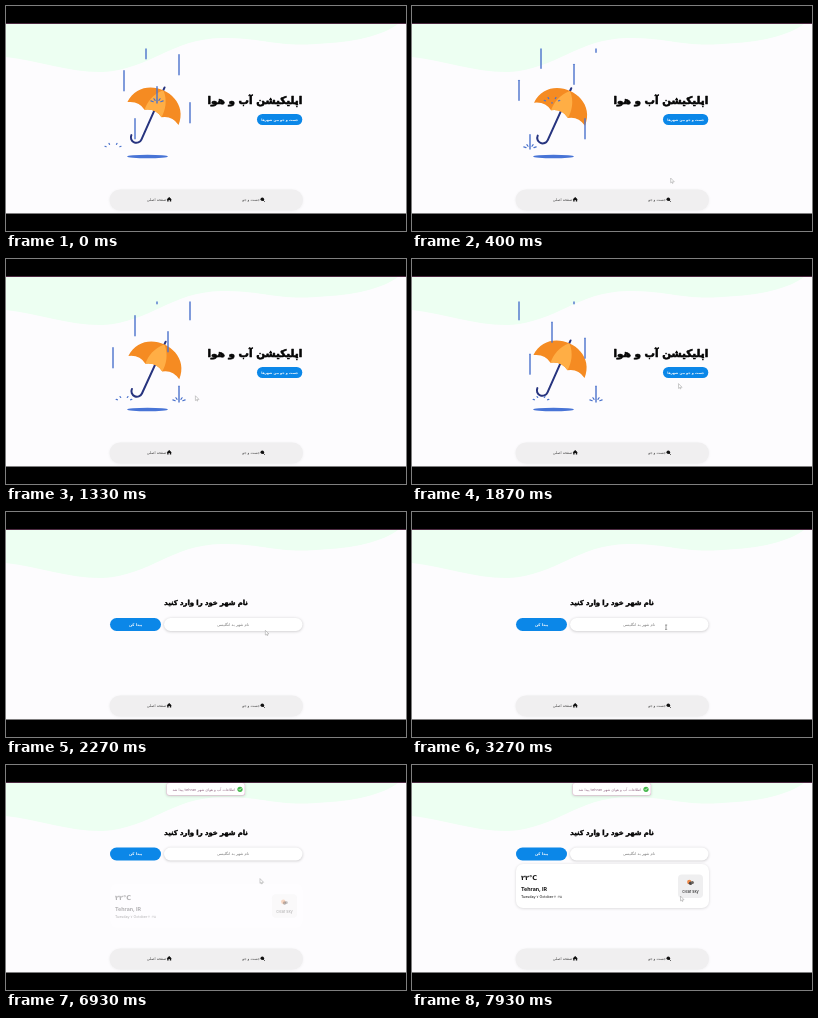
These frames come from a looping animation (400 by 225 pixels, 8 s). An HTML page with a canvas:

```html
<!DOCTYPE html>
<html lang="fa">
<head>
<meta charset="utf-8">
<title>Weather app</title>
<style>
  html, body { margin: 0; width: 100%; height: 100%; overflow: hidden; background: #000; }
  canvas { display: block; width: 400px; height: 225px; }
</style>
</head>
<body>
<canvas id="stage"></canvas>
<script>
const LOOP = 8000, HOME_END = 2270, FOCUS = 2730, FOUND = 6270;
const canvas = document.getElementById('stage');
const ctx = canvas.getContext('2d');
const ratio = window.devicePixelRatio || 1;
canvas.width = 400 * ratio;
canvas.height = 225 * ratio;

const BLUE = '#0b87e8', RAIN = '#4a72cc', NAVY = '#27347f';
const clamp = v => Math.max(0, Math.min(1, v));
const smooth = v => v * v * (3 - 2 * v);
const progress = (t, from, to) => clamp((t - from) / (to - from));

function text(str, x, y, size, color, { weight = 400, align = 'center', dir = 'rtl', family = 'DejaVu Sans', heavy = 0 } = {}) {
  ctx.font = `${weight} ${size}px "${family}", "DejaVu Sans", sans-serif`;
  ctx.direction = dir;
  ctx.textAlign = align;
  ctx.fillStyle = ctx.strokeStyle = color;
  ctx.fillText(str, x, y);
  if (heavy) {
    ctx.lineWidth = heavy;
    ctx.lineJoin = 'round';
    ctx.strokeText(str, x, y);
  }
}

function box(x, y, w, h, r, color, shadow) {
  ctx.save();
  if (shadow) {
    ctx.shadowColor = shadow;
    ctx.shadowBlur = 3 * ratio;
    ctx.shadowOffsetY = 0.6 * ratio;
  }
  ctx.fillStyle = color;
  ctx.beginPath();
  ctx.roundRect(x, y, w, h, r);
  ctx.fill();
  ctx.restore();
}

function ellipse(x, y, rx, ry, color) {
  ctx.fillStyle = color;
  ctx.beginPath();
  ctx.ellipse(x, y, rx, ry, 0, 0, 7);
  ctx.fill();
}

const circle = (x, y, r, color) => ellipse(x, y, r, r, color);

function line(color, width, ...points) {
  ctx.strokeStyle = color;
  ctx.lineWidth = width;
  ctx.lineCap = 'round';
  ctx.lineJoin = 'round';
  ctx.beginPath();
  points.forEach(([x, y]) => ctx.lineTo(x, y));
  ctx.stroke();
}

function shape(path, color) {
  ctx.fillStyle = color;
  ctx.fill(new Path2D(path));
}

function background() {
  ctx.fillStyle = '#fdfcfe';
  ctx.fillRect(0, 17, 400, 191);
  shape('M0 18V51C35 55 65 67 97 66C145 63 165 33 215 32C260 32 270 41 310 38C350 36 375 30 392 18Z', '#edfff2');
  ctx.fillStyle = '#4d2a42';
  ctx.fillRect(0, 17, 400, 1);
}

function navigation() {
  box(103.5, 183.5, 193.5, 21, 10.5, '#f0eff0', 'rgba(0,0,0,.06)');
  text('جست و جو', 245, 194.8, 3.7, '#444');
  text('صفحه اصلی', 150.5, 194.8, 3.8, '#444');
  circle(256.3, 193.2, 1.8, '#111');
  line('#111', 0.9, [257.2, 194.2], [258.4, 195.4]);
  shape('M160.6 193.4L163.2 191L165.8 193.4H165.2V195.6H163.8V194H162.6V195.6H161.2V193.4Z', '#111');
}

function splash(x, y, k) {
  const near = 4 + 5 * smooth(k), far = near + 2.4 * (1 - k) + 0.5;
  for (const angle of [0.45, 1.1]) {
    for (const side of [-1, 1]) {
      const dx = side * Math.cos(angle), dy = -0.7 * Math.sin(angle);
      line(RAIN, 1.2, [x + dx * near, y + dy * near], [x + dx * far, y + dy * far]);
    }
  }
}

// Eight columns of rain; the ones above the canopy stop there.
function rain(t) {
  const top = 43, speed = 0.16, period = 840;
  for (let i = 0; i < 8; i++) {
    const x = 107 + 11 * i;
    const land = i > 2 && i < 6 ? 97 : 143;
    const age = (t + 760 - 100 * (5 * i % 8)) % period;
    const head = top + age * speed;
    const from = Math.max(top, head - 20), to = Math.min(head, land);
    if (from < to) line(RAIN, 1.4, [x, from], [x, to]);
    const k = (head - land) / speed / 210;
    if (k > 0 && k < 1) splash(x, land, k);
  }
}

function umbrella(t) {
  const sway = (1 - Math.cos(t / 1870 * 2 * Math.PI)) / 2;
  ctx.save();
  ctx.translate(147 + 1.3 * sway, 107.5 + 1.8 * sway);
  ctx.rotate((24 + sway) * Math.PI / 180);
  ctx.strokeStyle = NAVY;
  ctx.lineWidth = 2;
  ctx.lineCap = 'round';
  ctx.stroke(new Path2D('M0 -28.5V28.5A5.5 5.5 0 0 1 -11 28.5'));
  shape('M-28 0C-27 -34 27 -34 28 0Q18 -6 9.3 0Q0 -6 -9.3 0Q-18 -6 -28 0Z', '#f58b22');
  shape('M0 -25.5C-8 -18 -10 -8 -9.3 0Q0 -6 9.3 0C10 -8 8 -18 0 -25.5Z', '#ffae45');
  ctx.restore();
}

function home(t) {
  ellipse(141.5, 150.5, 20.5, 1.8, '#4874d6');
  umbrella(t);
  rain(t);
  text('اپلیکیشن آب و هوا', 296.3, 97.8, 10.4, '#060606', { weight: 700, align: 'right', heavy: 0.6 });
  box(251, 108, 45.3, 11, 5.5, BLUE);
  text('جست و جو بین شهرها', 273.7, 114.8, 3.3, '#fff', { weight: 700 });
}

function searchForm(t) {
  const firstKey = 4130, keyGap = 180, blink = 500;
  const keys = Math.max(0, Math.min(6, Math.floor((t - firstKey) / keyGap) + 1));
  const typed = t < FOUND ? 'tehran'.slice(0, keys) : '';
  ctx.save();
  if (t >= FOUND) ctx.translate(0, -23.5);
  text('نام شهر خود را وارد کنید', 200, 93.2, 6.8, '#060606', { weight: 700, heavy: 0.45 });
  box(104, 106, 51, 13, 6.5, BLUE);
  text('پیدا کن', 129.5, 113.8, 3.7, '#fff', { weight: 700 });
  box(158, 106, 138.5, 13, 6.5, '#fff', 'rgba(0,0,0,.22)');
  if (typed) text(typed, 227, 113.6, 3.5, '#444', { dir: 'ltr', family: 'Inter' });
  else text('نام شهر به انگلیسی', 227, 113.8, 3.9, '#777');
  const lastInput = keys ? firstKey + (keys - 1) * keyGap : FOCUS;
  if (t >= FOCUS && t < FOUND && Math.floor((t - lastInput) / blink) % 2 === 0) {
    const x = 227 - (typed ? ctx.measureText(typed).width / 2 + 0.5 : 0);
    line('#333', 0.6, [x, 110.3], [x, 114.7]);
  }
  ctx.restore();
}

function weatherCard(t) {
  const k = smooth(progress(t, 6570, 7530));
  if (!k) return;
  const latin = { weight: 700, align: 'left', dir: 'ltr', family: 'Inter' };
  ctx.save();
  ctx.globalAlpha = k;
  ctx.translate(0, 29 * (1 - k));
  box(104, 99, 193, 44, 7, '#fff', `rgba(0,0,0,${0.16 * k ** 3})`);
  text('۲۲°C', 109, 115, 6.6, '#111', { ...latin, family: 'DejaVu Sans' });
  text('Tehran, IR', 109, 125.8, 5.3, '#111', latin);
  text('Tuesday ۷ October ۲۰۲۵', 109, 132.8, 3.6, '#333', { ...latin, weight: 500 });
  box(266, 109.5, 25, 23.5, 4, '#efeff0');
  circle(277.3, 117, 2.2, '#ef8a4a');
  circle(278.6, 118.3, 1.8, '#4a4745');
  circle(280.4, 117.6, 1.5, '#6b6661');
  text('clear sky', 278.5, 128.2, 3.8, '#333', { ...latin, weight: 500, align: 'center' });
  ctx.restore();
}

function toast(t) {
  const k = progress(t, FOUND, FOUND + 350);
  if (!k) return;
  ctx.save();
  ctx.globalAlpha = k;
  ctx.translate(0, -18 * (1 - k) ** 3);
  box(160.5, 18, 78.5, 12.5, 2.5, '#e9b9d8', 'rgba(0,0,0,.2)');
  box(160.9, 18, 77.7, 12, 2.3, '#fff');
  text('اطلاعات آب و هوای شهر tehran پیدا شد', 229, 25.8, 3.6, '#8f6480', { align: 'right' });
  const pop = progress(t, FOUND + 100, FOUND + 400);
  circle(234, 24.3, 2.6 * pop, '#43b649');
  if (pop === 1) line('#fff', 0.7, [232.9, 24.4], [233.7, 25.2], [235.2, 23.4]);
  ctx.restore();
}

// Pointer stops: time, x, y.
const STOPS = [
  [60, 373, 191], [800, 114, 149], [1870, 266.5, 125],
  [2600, 254, 114], [7590, 254, 114], [7930, 268.5, 131.5]
];

function pointer(t) {
  if (t < STOPS[0][0]) return;
  let [, x, y] = STOPS[0];
  for (let i = 1; i < STOPS.length; i++) {
    const k = smooth(progress(t, STOPS[i - 1][0], STOPS[i][0]));
    x += (STOPS[i][1] - STOPS[i - 1][1]) * k;
    y += (STOPS[i][2] - STOPS[i - 1][2]) * k;
  }
  ctx.save();
  ctx.translate(x, y);
  if (t >= FOCUS && t < FOUND) {
    line('#777', 0.7, [0, -1], [0, 3.4]);
    line('#777', 0.6, [-0.8, -1], [0.8, -1]);
    line('#777', 0.6, [-0.8, 3.4], [0.8, 3.4]);
  } else {
    const arrow = new Path2D('M0 0V4.4L1 3.5L1.7 5L2.4 4.7L1.8 3.3H3.2Z');
    ctx.fillStyle = '#fff';
    ctx.fill(arrow);
    ctx.strokeStyle = '#999';
    ctx.lineWidth = 0.5;
    ctx.stroke(arrow);
  }
  ctx.restore();
}

function draw(t) {
  ctx.setTransform(ratio, 0, 0, ratio, 0, 0);
  ctx.fillStyle = '#000';
  ctx.fillRect(0, 0, 400, 225);
  ctx.save();
  ctx.beginPath();
  ctx.rect(0, 17, 400, 190.5);
  ctx.clip();
  background();
  if (t < HOME_END) {
    home(t);
  } else {
    searchForm(t);
    weatherCard(t);
    toast(t);
  }
  navigation();
  pointer(t);
  ctx.restore();
}

const startTime = performance.now();
function frame() {
  draw((performance.now() - startTime) % LOOP);
  requestAnimationFrame(frame);
}
frame();
</script>
</body>
</html>
```
